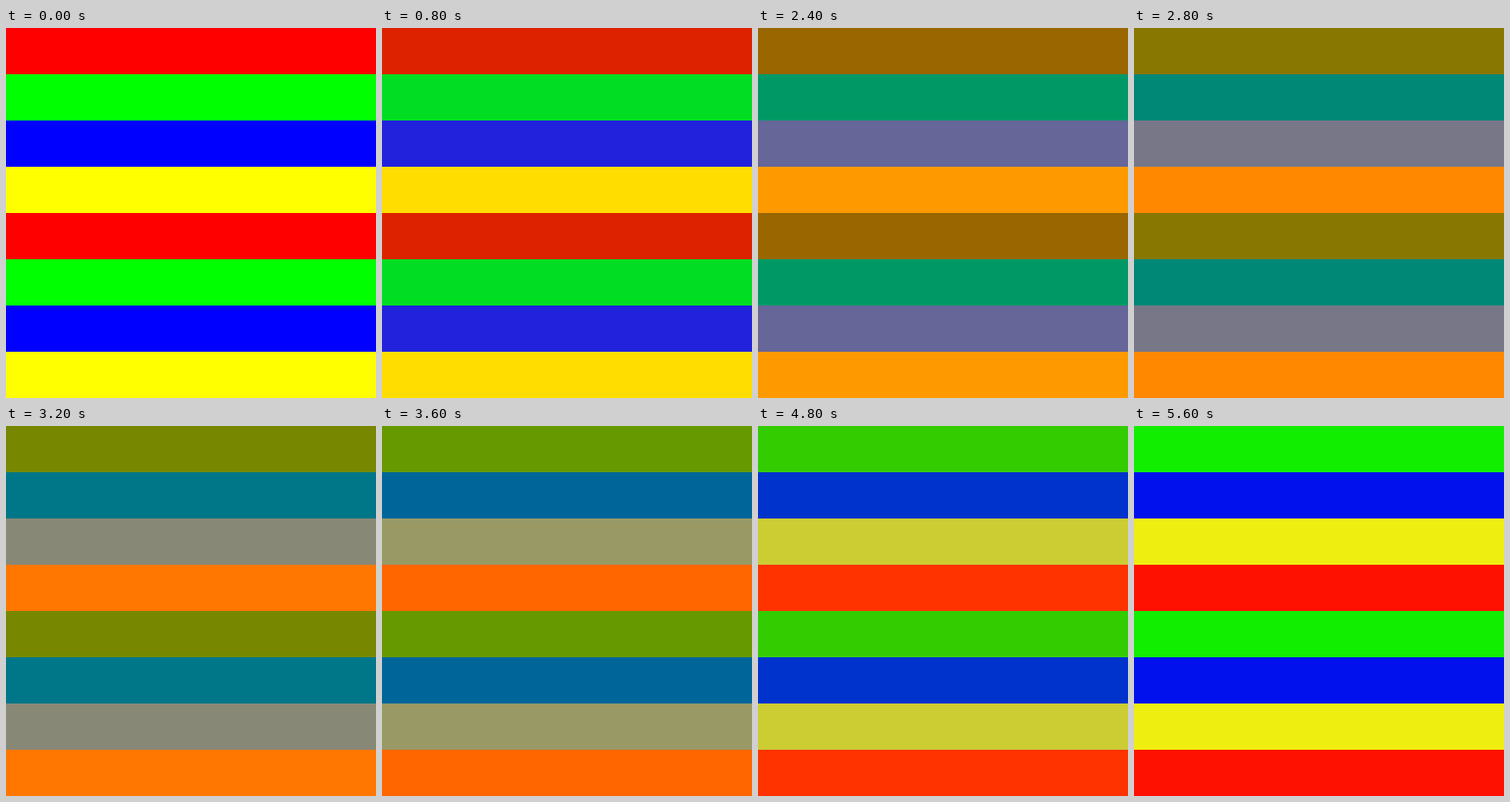
Write an HTML page that moves like this. It is 400 px wide and 400 px high and loops after 6000 ms.

```html
<!DOCTYPE html>
<html lang="en">
<head>
<meta charset="utf-8">
<title>Shifting stripes</title>
<style>
  html, body { margin: 0; width: 100%; height: 100%; overflow: hidden; }
  svg { display: block; width: 100%; height: 100%; }
</style>
</head>
<body>
<svg viewBox="0 0 400 400" shape-rendering="crispEdges"></svg>
<script>
  const STEP = 400, STEPS = 15, STRIPES = 8, HEIGHT = 50;
  const colors = [[255, 0, 0], [0, 255, 0], [0, 0, 255], [255, 255, 0]];
  const svg = document.querySelector('svg');

  const stripes = Array.from({ length: STRIPES }, (_, i) => {
    const rect = document.createElementNS('http://www.w3.org/2000/svg', 'rect');
    rect.setAttribute('y', i * HEIGHT);
    rect.setAttribute('width', 400);
    rect.setAttribute('height', HEIGHT);
    return svg.appendChild(rect);
  });

  const mix = (a, b, t) => a.map((v, i) => Math.round(v + (b[i] - v) * t));

  // Each stripe fades in discrete steps towards the next colour in the cycle.
  function draw(time) {
    const t = (Math.floor(time / STEP) % STEPS) / STEPS;
    stripes.forEach((rect, i) => {
      const from = colors[i % colors.length];
      const to = colors[(i + 1) % colors.length];
      rect.setAttribute('fill', `rgb(${mix(from, to, t)})`);
    });
  }

  const start = performance.now();
  function tick() {
    draw(performance.now() - start);
    requestAnimationFrame(tick);
  }
  tick();
</script>
</body>
</html>
```
